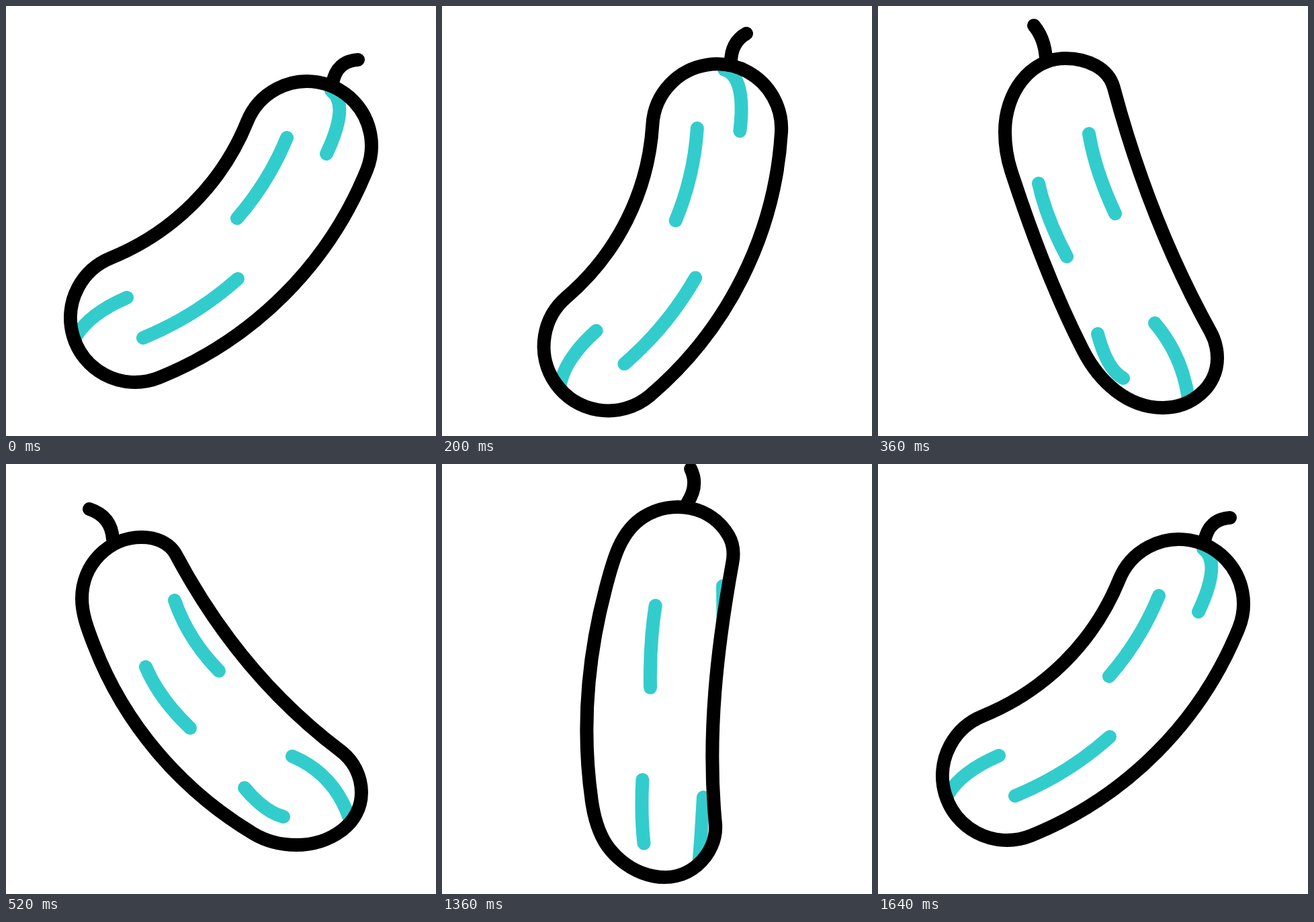
Animation, 640 px wide and 640 px high, one loop 2 s. Source, as an HTML page:

```html
<!DOCTYPE html>
<html lang="en">
<head>
<meta charset="utf-8">
<title>Rolling cucumber</title>
<style>
  html, body { margin: 0; width: 100%; height: 100%; overflow: hidden; background: #fff; }
  svg { display: block; width: 100%; height: 100%; }
  path { fill: none; stroke: #000; stroke-width: 20; stroke-linecap: round; stroke-linejoin: round; }
  .stripes path { stroke: #33cccc; }
  clipPath path { fill: #000; stroke: none; }
</style>
</head>
<body>
<svg viewBox="0 0 640 640">
  <defs><clipPath id="inside"><path class="skin"/></clipPath></defs>
  <g id="cucumber">
    <g class="stripes" clip-path="url(#inside)"></g>
    <path id="stem"/>
    <path class="skin"/>
  </g>
</svg>
<script>
const LOOP = 2000, STEP = 40, PIVOT = [320, 330], RAD = Math.PI / 180;
const { sin, cos, atan2, hypot, SQRT2 } = Math;
const ROOT5 = Math.sqrt(5);

// Stage point -> coordinates of the upright cucumber tilted by `tilt` degrees
function upright(x, y, tilt) {
  const dx = x - PIVOT[0], dy = y - PIVOT[1], c = cos(tilt * RAD), s = sin(tilt * RAD);
  return [dx * c + dy * s, dy * c - dx * s];
}
const localNodes = (nodes, tilt) =>
  nodes.flatMap(([x, y, dir]) => [...upright(x, y, tilt), dir - tilt]);
const localCurves = (curves, tilt) =>
  curves.flatMap(c => [0, 2, 4].flatMap(i => upright(c[i], c[i + 1], tilt)));
const shift = (list, dx, dy = 0, size = 2) =>
  list.map((v, i) => v + (i % size === 0 ? dx : i % size === 1 ? dy : 0));

// Vector layout: tilt, 8 outline nodes (x, y, heading), stem, 8 stripes
const pose = (tilt, nodes, stem, stripes) => [tilt, ...nodes, ...stem, ...stripes];

const cap = (cx, cy, headings) => headings.map(h =>
  [cx + 96 * sin(h * RAD), cy - 96 * cos(h * RAD), h]);

const right = {
  tilt: 45,
  nodes: [...cap(448, 208, [-68, -28, 47, 112]), ...cap(192, 464, [158, 208, 298, 338])],
  stem: [[486, 115, 492, 82, 524, 80]],
  stripes: [
    [418, 196, 391, 262, 344, 316],
    [345, 406, 282, 462, 204, 494],
    [477, 220, 512, 146, 484, 126],
    [180, 434, 124, 458, 104, 492]]
};
const swing = {
  tilt: -22,
  nodes: [[198, 245, -108], [189, 187, -90], [279, 78, 0], [351, 122, 75],
          [495, 485, 61], [505, 524, 90], [424, 598, 180], [305, 512, 243]],
  stem: [[250, 78, 248, 48, 232, 29]],
  stripes: [
    [314, 190, 323, 245, 353, 309],
    [239, 264, 250, 315, 281, 373],
    [327, 488, 341, 541, 365, 554],
    [412, 472, 453, 520, 462, 585]]
};
const left = {
  tilt: -39,
  nodes: [[131, 270, -111], [113, 200, -90], [202, 109, 0], [253, 135, 62],
          [498, 427, 37], [529, 489, 90], [432, 567, 180], [368, 550, 211]],
  stem: [[159, 112, 157, 78, 124, 67]],
  stripes: [
    [251, 203, 271, 261, 317, 308],
    [208, 302, 228, 349, 274, 393],
    [355, 482, 385, 518, 413, 525],
    [426, 435, 488, 461, 511, 527]]
};
const straight = {
  tilt: 35,
  nodes: [[330, 182, -56], [444, 105, 0], [532, 192, 90], [525, 230, 122],
          [293, 560, 125], [229, 590, 180], [140, 490, 270], [168, 410, 305]],
  stem: [[494, 112, 514, 93, 523, 74]],
  stripes: [
    [433, 224, 399, 265, 362, 331],
    [383, 412, 340, 465, 292, 540],
    [495, 247, 513, 207, 522, 165],
    [249, 471, 225, 523, 188, 568]],
  leaving: [
    [332, 197, 300, 245, 268, 301],
    [192, 402, 154, 438, 152, 475]]
};
for (const p of [right, swing, left, straight]) {
  p.nodes = localNodes(p.nodes, p.tilt);
  p.stem = localCurves(p.stem, p.tilt);
  p.stripes = localCurves(p.stripes, p.tilt);
}

// The roll carries one set of stripes out of sight and the other set in
const ROLL = 165;
const [first, last] = localCurves(straight.leaving, straight.tilt)
  .reduce((halves, v, i) => (halves[i < 6 ? 0 : 1].push(v), halves), [[], []]);

const atRight = pose(right.tilt, right.nodes, right.stem,
  [...right.stripes, ...shift(left.stripes, -ROLL)]);
const leaning = pose(26.5, shift(right.nodes, 9.7, 4.9, 3),
  localCurves([[430, 84, 430, 54, 453, 41]], 26.5),
  [...shift(right.stripes, 13, 5), ...shift(left.stripes, 4 - ROLL)]);
const swinging = pose(swing.tilt, swing.nodes, swing.stem,
  [...shift(right.stripes, ROLL - 18), ...swing.stripes]);
const atLeft = pose(left.tilt, left.nodes, left.stem,
  [...shift(right.stripes, ROLL), ...left.stripes]);
const lifting = pose(-36.6, shift(left.nodes, 2.6, 3.2, 3), shift(left.stem, 2, 2),
  [...shift(right.stripes, ROLL), ...shift(left.stripes, 4, 4)]);
const returning = pose(straight.tilt, straight.nodes, straight.stem,
  [...straight.stripes, ...first, ...shift(left.stripes.slice(6, 18), -124), ...last]);

const there = [[80, atRight], [200, leaning], [360, swinging], [520, atLeft]];
const back = [[1160, atLeft], [1200, lifting], [1480, returning], [1640, atRight]];

// Cubic Hermite through the keys, at rest on both ends
function sample(keys, t) {
  const end = keys.length - 1;
  if (t <= keys[0][0]) return keys[0][1];
  if (t >= keys[end][0]) return keys[end][1];
  const k = keys.findIndex(key => key[0] > t) - 1;
  const span = j => keys[j + 1][0] - keys[j][0];
  const rate = (j, i) => (keys[j + 1][1][i] - keys[j][1][i]) / span(j);
  const slope = (j, i) => j === 0 || j === end ? 0 :
    (rate(j - 1, i) * span(j) + rate(j, i) * span(j - 1)) / (span(j) + span(j - 1));
  const h = span(k), u = (t - keys[k][0]) / h, ease = u * u * (3 - 2 * u);
  return keys[k][1].map((v, i) => v + (keys[k + 1][1][i] - v) * ease
    + h * u * (1 - u) * ((1 - u) * slope(k, i) - u * slope(k + 1, i)));
}

// Hobby's handle length for leaving and arriving angles
const reach = (a, b) =>
  (2 + SQRT2 * (sin(a) - sin(b) / 16) * (sin(b) - sin(a) / 16) * (cos(a) - cos(b))) /
  (3 * (1 + (ROOT5 - 1) / 2 * cos(a) + (3 - ROOT5) / 2 * cos(b)));

const fmt = list => list.map(v => v.toFixed(2)).join(" ");

function outline(nodes) {
  let d = "M" + fmt(nodes.slice(0, 2));
  for (let i = 0; i < nodes.length; i += 3) {
    const j = (i + 3) % nodes.length;
    const [x0, y0, h0] = nodes.slice(i, i + 3), [x1, y1, h1] = nodes.slice(j, j + 3);
    const chord = atan2(y1 - y0, x1 - x0), size = hypot(x1 - x0, y1 - y0);
    const a = h0 * RAD, b = h1 * RAD;
    const out = size * reach(a - chord, chord - b), into = size * reach(chord - b, a - chord);
    d += "C" + fmt([x0 + out * cos(a), y0 + out * sin(a),
      x1 - into * cos(b), y1 - into * sin(b), x1, y1]);
  }
  return d + "Z";
}
const curve = c => "M" + fmt(c.slice(0, 2)) + "Q" + fmt(c.slice(2, 6));

const cucumber = document.getElementById("cucumber");
const stem = document.getElementById("stem");
const skins = document.querySelectorAll(".skin");
const stripeGroup = document.querySelector(".stripes");
const stripes = Array.from({ length: 8 }, () =>
  stripeGroup.appendChild(document.createElementNS("http://www.w3.org/2000/svg", "path")));

function draw(time) {
  const t = Math.floor((time % LOOP) / STEP) * STEP;
  const v = t < 1160 ? sample(there, t) : sample(back, t);
  cucumber.setAttribute("transform", `translate(${PIVOT}) rotate(${v[0].toFixed(3)})`);
  const d = outline(v.slice(1, 25));
  skins.forEach(skin => skin.setAttribute("d", d));
  stem.setAttribute("d", curve(v.slice(25, 31)));
  stripes.forEach((s, i) => s.setAttribute("d", curve(v.slice(31 + i * 6, 37 + i * 6))));
}

const start = performance.now();
function tick() {
  draw(performance.now() - start);
  requestAnimationFrame(tick);
}
tick();
</script>
</body>
</html>
```
